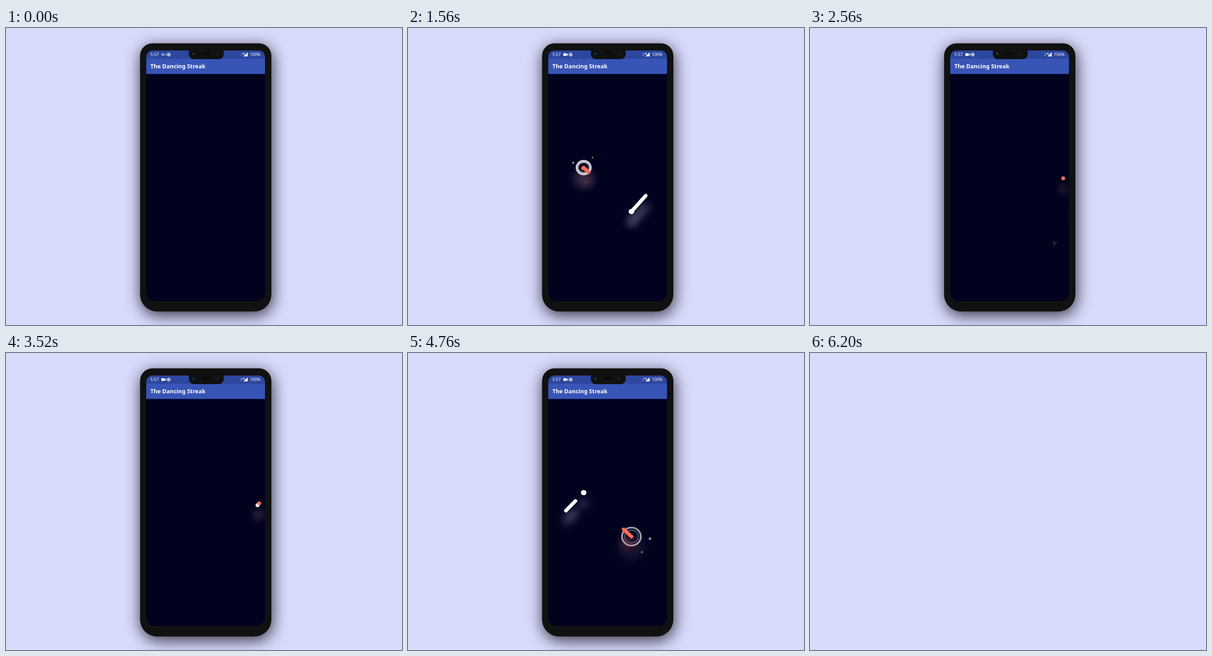
Recreate the animation shown at these times as an HTML page with a canvas. Size 864 by 648 pixels, loop 6360 ms.

```html
<!DOCTYPE html>
<html lang="en">
<head>
<meta charset="utf-8">
<title>The Dancing Streak</title>
<style>
html, body { margin: 0; width: 100%; height: 100%; overflow: hidden; background: #d8dbfc; }
canvas { display: block; width: 864px; height: 648px; }
</style>
</head>
<body>
<canvas id="stage" width="864" height="648"></canvas>
<script>
const ctx = document.getElementById('stage').getContext('2d');
const LOOP = 6360, STEP = 40, PASS = 3130, RED_DELAY = 390, GONE = 6200;
const FONT = '"Noto Sans", "Open Sans", sans-serif';
const DARK = '#111111', BODY = '#00021e', RED = '#ff6a55';
const YELLOW = '#d9a02c', BLUE = '#2c5fd0';

const B = [383.3, 304.6], C = [487.5, 400.5];
const ROUTE = [[319, 370], B, C, [552.5, 328]];
const BACK = [...ROUTE].reverse();

// Travelled share of the route against time in a pass
const HEAD = [[0, 0], [390, .018], [730, .064], [1120, .295], [1240, .365], [1440, .69],
  [1570, .855], [1630, .89], [1760, .945], [1960, .987], [2200, 1]];
const TAIL = [[0, 0], [390, 0], [730, .04], [1120, .257], [1240, .294], [1570, .724],
  [1630, .8], [1760, .885], [1960, .966], [2200, 1]];

const SPARKS_B = [
  { dx: -49.5, dy: -23, color: '#ffffff' },
  { dx: 42, dy: -47, color: YELLOW, tri: true },
  { dx: 9.5, dy: 68, color: BLUE, tri: true }
];
const SPARKS_C = [
  { dx: 69, dy: 8, color: '#ffffff' },
  { dx: 39, dy: 58, color: YELLOW, tri: true }
];
const RIPPLES = [
  { at: B, start: 1137, sparks: SPARKS_B },
  { at: C, start: 1415, sparks: SPARKS_C },
  { at: C, start: 4215, sparks: SPARKS_C },
  { at: B, start: 4615, sparks: SPARKS_B }
];
const RIPPLE_LIFE = 1200;

const clamp = (v, a, b) => Math.max(a, Math.min(b, v));

// Monotone cubic through the keys
function curve(keys, t) {
  const last = keys.length - 1;
  if (t <= keys[0][0]) return keys[0][1];
  if (t >= keys[last][0]) return keys[last][1];
  const slope = i => (keys[i + 1][1] - keys[i][1]) / (keys[i + 1][0] - keys[i][0]);
  const tangent = i => {
    if (i === 0 || i === last) return 0;
    const a = slope(i - 1), b = slope(i);
    return a * b > 0 ? 2 * a * b / (a + b) : 0;
  };
  const i = keys.findIndex(k => k[0] > t) - 1;
  const h = keys[i + 1][0] - keys[i][0], u = (t - keys[i][0]) / h, v = 1 - u;
  return v * v * (1 + 2 * u) * keys[i][1] + u * u * (3 - 2 * u) * keys[i + 1][1]
    + h * u * v * (v * tangent(i) - u * tangent(i + 1));
}

// Points of the route between two shares of its length
function slice(route, from, to) {
  const lens = route.slice(1).map((p, i) => Math.hypot(p[0] - route[i][0], p[1] - route[i][1]));
  const total = lens.reduce((a, b) => a + b);
  const point = share => {
    let d = share * total, i = 0;
    while (i < lens.length - 1 && d > lens[i]) d -= lens[i++];
    const u = d / lens[i], [p, q] = [route[i], route[i + 1]];
    return [p[0] + (q[0] - p[0]) * u, p[1] + (q[1] - p[1]) * u];
  };
  const pts = [point(from)];
  let sum = 0;
  lens.slice(0, -1).forEach((len, i) => {
    sum += len;
    if (sum > from * total && sum < to * total) pts.push(route[i + 1]);
  });
  pts.push(point(to));
  return pts;
}

function glow(g, color) {
  g.shadowColor = color;
  g.shadowBlur = 20;
  g.shadowOffsetY = 23;
}

function streak(route, t, color, light) {
  const pts = slice(route, curve(TAIL, t), curve(HEAD, t));
  const end = pts[pts.length - 1];
  ctx.save();
  glow(ctx, light);
  ctx.strokeStyle = color;
  ctx.lineWidth = 7.8;
  ctx.lineCap = ctx.lineJoin = 'round';
  ctx.beginPath();
  pts.forEach(p => ctx.lineTo(p[0], p[1]));
  ctx.lineTo(end[0] + .01, end[1]);
  ctx.stroke();
  ctx.restore();
}

function oval(r) {
  ctx.beginPath();
  ctx.ellipse(0, 0, r, r * .955, 0, 0, 7);
}

function ripple({ at, start, sparks }, t) {
  const age = t - start;
  if (age <= 0 || age >= RIPPLE_LIFE) return;
  const outer = .0413 * age, width = Math.max(.6, 8.2 - .0078 * age);
  ctx.save();
  ctx.translate(at[0], at[1]);
  ctx.fillStyle = ctx.strokeStyle = '#ffffff';
  ctx.globalAlpha = Math.min(1, ((RIPPLE_LIFE - age) / 901) ** 1.6);
  ctx.save();
  glow(ctx, 'rgba(225,230,255,.7)');
  if (outer < width) {
    oval(outer);
    ctx.fill();
  } else {
    ctx.lineWidth = width;
    oval(outer - width / 2);
    ctx.stroke();
  }
  ctx.restore();
  if (age > 300 && age < 790) {
    ctx.globalAlpha *= clamp((790 - age) / 200, 0, 1);
    ctx.lineWidth = 1.1;
    oval(outer * .655);
    ctx.stroke();
  }
  if (age > 200) {
    const k = (age + 40) / 1000;
    ctx.globalAlpha = clamp(1.1 - .0008 * age, 0, 1);
    sparks.forEach(s => spark(s, k, (.288 * (age - 545) + 30) * Math.PI / 180));
  }
  ctx.restore();
}

function spark({ dx, dy, color, tri }, k, turn) {
  ctx.save();
  ctx.translate(dx * k, dy * k);
  ctx.fillStyle = color;
  if (tri) {
    const r = 6 * k;
    ctx.rotate(turn);
    ctx.beginPath();
    for (let i = 0; i < 3; i++) {
      const a = i * Math.PI * 2 / 3;
      ctx.lineTo(r * Math.sin(a), -r * Math.cos(a));
    }
  } else {
    ctx.globalAlpha *= .86;
    oval(4.8 * k);
  }
  ctx.fill();
  ctx.restore();
}

function box(g, x, y, w, h, radii, color) {
  g.fillStyle = color;
  g.beginPath();
  g.roundRect(x, y, w, h, radii);
  g.fill();
}

function dot(g, x, y, r, color) {
  box(g, x - r, y - r, 2 * r, 2 * r, r, color);
}

function label(g, text, x, y, font) {
  g.font = font + ' ' + FONT;
  g.fillStyle = '#ffffff';
  g.fillText(text, x, y);
}

function makePhone() {
  const sheet = document.createElement('canvas');
  sheet.width = 864;
  sheet.height = 648;
  const g = sheet.getContext('2d');
  g.save();
  g.shadowColor = 'rgba(0,0,10,.78)';
  g.shadowBlur = 34;
  g.shadowOffsetX = 2;
  g.shadowOffsetY = 8;
  box(g, 292.5, 33.5, 286.5, 585, [27, 27, 37, 37], DARK);
  g.restore();

  g.save();
  g.beginPath();
  g.roundRect(306, 49, 259, 547, [14, 14, 19, 19]);
  g.clip();
  g.fillStyle = BODY;
  g.fillRect(306, 49, 259, 547);
  g.fillStyle = '#2d479f';
  g.fillRect(306, 49, 259, 18.5);
  g.fillStyle = '#3755b6';
  g.fillRect(306, 67, 259, 33.3);
  g.restore();

  box(g, 399, 47, 76, 21, [0, 0, 11, 11], DARK);
  dot(g, 409, 56, 3.2, '#0c1622');
  dot(g, 409, 56, 1.5, '#2470a8');
  box(g, 428, 52.5, 17, 6.5, 3, '#090909');
  dot(g, 460, 56, 4, '#0c1420');
  box(g, 457.5, 54, 1.5, 4, .5, '#1b2a48');
  box(g, 461, 54, 1.5, 4, .5, '#1b2a48');

  label(g, '5:57', 315, 61.3, '9.2px');
  label(g, '100%', 532, 61.3, '9.2px');
  label(g, '4G', 515.8, 57.6, 'bold 4.5px');
  label(g, 'The Dancing Streak', 315, 88.3, '600 12.4px');
  dot(g, 355, 58, 4.3, '#a9b3d6');
  g.fillStyle = '#ffffff';
  g.beginPath();
  g.moveTo(518, 62);
  g.lineTo(527.3, 62);
  g.lineTo(527.3, 53);
  g.fill();
  return sheet;
}

function statusIcons(t) {
  ctx.save();
  ctx.globalAlpha = clamp(.4 + t / 400, 0, 1);
  box(ctx, 339, 55, 6.8, 6, 1, '#ffffff');
  ctx.beginPath();
  ctx.moveTo(345.5, 58);
  ctx.lineTo(349, 55.2);
  ctx.lineTo(349, 60.8);
  ctx.fill();
  ctx.globalAlpha = t < 1300 ? .35 : .9;
  box(ctx, 512.2, 55.2, 1.8, 1.8, .5, '#ffffff');
  box(ctx, 512.2, 59, 1.8, 1.8, .5, '#ffffff');
  ctx.restore();
}

const phone = makePhone();

function draw(t) {
  ctx.fillStyle = '#d8dbfc';
  ctx.fillRect(0, 0, 864, 648);
  if (t >= GONE) return;
  ctx.drawImage(phone, 0, 0);
  statusIcons(t);
  if (t < STEP) return;
  ctx.save();
  ctx.beginPath();
  ctx.rect(306, 100.3, 259, 495);
  ctx.clip();
  const route = t < PASS ? ROUTE : BACK, local = t % PASS;
  RIPPLES.forEach(r => ripple(r, t));
  streak(route, local, '#ffffff', 'rgba(225,235,255,.7)');
  streak(route, local - RED_DELAY, RED, 'rgba(255,80,70,.65)');
  ctx.restore();
}

const begin = performance.now();
function tick() {
  const t = (performance.now() - begin) % LOOP;
  draw(Math.floor(t / STEP) * STEP);
  requestAnimationFrame(tick);
}
tick();
</script>
</body>
</html>
```
